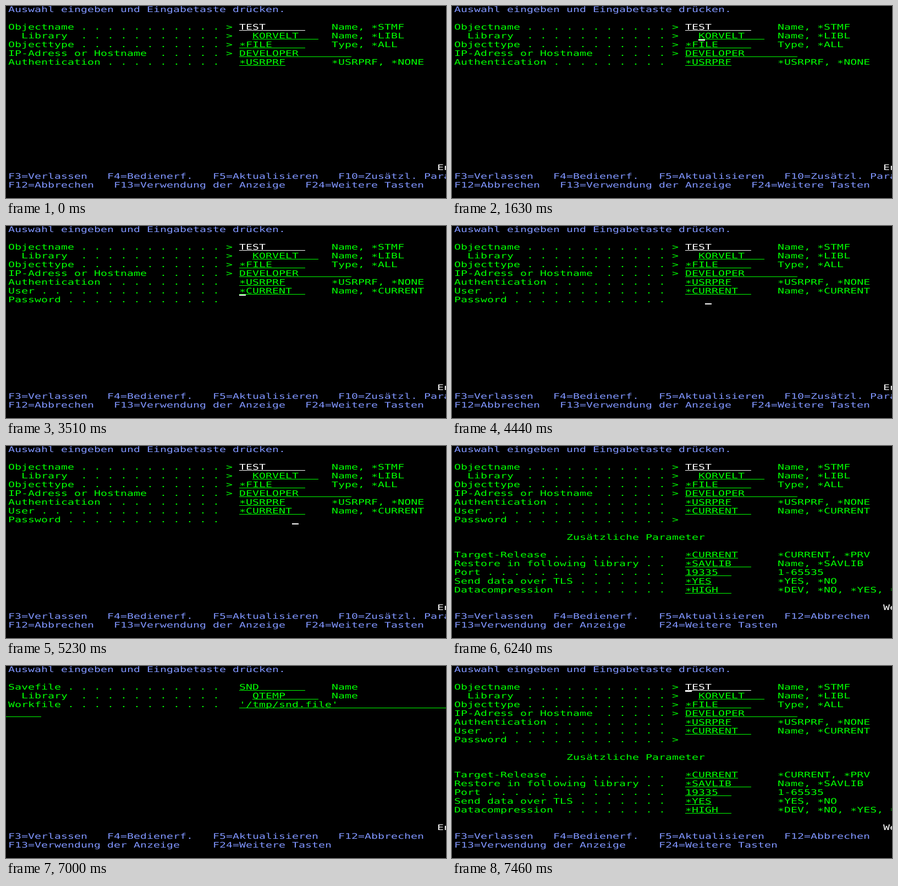
An HTML page for the animation above (8000 ms loop, 800 by 350 pixels).

```html
<!DOCTYPE html>
<html lang="de">
<head>
<meta charset="utf-8">
<title>Terminal</title>
<style>
  html, body { margin: 0; width: 100%; height: 100%; overflow: hidden; background: #000; }
  svg { display: block; }
  text { font: 14px "DejaVu Sans Mono", monospace; white-space: pre; text-rendering: geometricPrecision; }
  rect { shape-rendering: crispEdges; }
</style>
</head>
<body>
<svg id="stage" width="800" height="350" viewBox="0 0 800 350"></svg>
<script>
const LOOP = 8000, CELL_W = 12, CELL_H = 16, LEFT = 4, BASE = 11;
const WIDE = CELL_W / (14 * 0.60205); // wide terminal face on a 12px grid
const GREEN = '#00ff00', BLUE = '#8096ff', WHITE = '#ffffff';
const FIELD = 35, HINT = 49;

const colX = col => LEFT + col * CELL_W;
const rowY = row => BASE + row * CELL_H;

// Asterisks sit at mid height in this terminal face.
function shifts(str) {
  const drop = ch => (ch === '*' ? 2 : 0);
  return [...str].map((ch, i) => drop(ch) - (i ? drop(str[i - 1]) : 0)).join(' ');
}

function put(row, col, str, color = GREEN) {
  const dy = str.includes('*') ? ` dy="${shifts(str)}"` : '';
  return `<text xml:space="preserve" fill="${color}"${dy} ` +
    `transform="translate(${colX(col)} ${rowY(row)}) scale(${WIDE} 1)">${str}</text>`;
}

const line = (row, x, width, color = GREEN) =>
  `<rect x="${x}" y="${rowY(row) + 1}" width="${width}" height="1" fill="${color}"/>`;

function label(row, str, marked) {
  let out = str;
  for (let c = str.length; c < 33; c++) out += c % 2 && c > str.length ? '.' : ' ';
  return put(row, 0, out + (marked ? '>' : ''));
}

function field(row, name, value, cells, hint = '', { marked = false, col = FIELD, color = GREEN } = {}) {
  return label(row, name, marked) + put(row, col, value, color) +
    line(row, colX(col), cells * CELL_W, color) + (hint && put(row, HINT, hint));
}

const keys = (row, ...pairs) => pairs.map(([col, str]) => put(row, col, str, BLUE)).join('');

const title = put(0, 0, 'Auswahl eingeben und Eingabetaste drücken.', BLUE);
const more = str => put(18, 65, str, WHITE);

const mainKeys = more('Ende') +
  keys(19, [0, 'F3=Verlassen'], [15, 'F4=Bedienerf.'], [31, 'F5=Aktualisieren'], [50, 'F10=Zusätzl. Parameter']) +
  keys(20, [0, 'F12=Abbrechen'], [16, 'F13=Verwendung der Anzeige'], [45, 'F24=Weitere Tasten']);

const extraKeys =
  keys(19, [0, 'F3=Verlassen'], [15, 'F4=Bedienerf.'], [31, 'F5=Aktualisieren'], [50, 'F12=Abbrechen']) +
  keys(20, [0, 'F13=Verwendung der Anzeige'], [31, 'F24=Weitere Tasten']);

const marked = true;
const basic =
  field(2, 'Objectname', 'TEST', 10, 'Name, *STMF', { marked, color: WHITE }) +
  field(3, '  Library', 'KORVELT', 10, 'Name, *LIBL', { marked, col: FIELD + 2 }) +
  field(4, 'Objecttype', '*FILE', 10, 'Type, *ALL', { marked }) +
  field(5, 'IP-Adress or Hostname', 'DEVELOPER', 17, '', { marked }) +
  field(6, 'Authentication', '*USRPRF', 7, '*USRPRF, *NONE');
const user = field(7, 'User', '*CURRENT', 10, 'Name, *CURRENT');

const screens = {
  object: title + basic + mainKeys,
  login: title + basic + user + label(8, 'Password') + mainKeys,
  extra: title + basic + user + label(8, 'Password', marked) +
    put(10, 17, 'Zusätzliche Parameter') +
    field(12, 'Target-Release', '*CURRENT', 8, '*CURRENT, *PRV') +
    field(13, 'Restore in following library', '*SAVLIB', 10, 'Name, *SAVLIB') +
    field(14, 'Port', '19335', 7, '1-65535') +
    field(15, 'Send data over TLS', '*YES', 4, '*YES, *NO') +
    field(16, 'Datacompression', '*HIGH', 7, '*DEV, *NO, *YES, *') +
    more('Weitere') + extraKeys,
  files: title +
    field(2, 'Savefile', 'SND', 10, 'Name') +
    field(3, '  Library', 'QTEMP', 10, 'Name', { col: FIELD + 2 }) +
    field(4, 'Workfile', "'/tmp/snd.file'", 32) + line(5, 0, 64) +
    more('Ende') + extraKeys
};

const screenTimes = [[0, 'object'], [2410, 'login'], [5690, 'extra'], [6540, 'files'], [7460, 'extra']];

// [time, row, column]; no row means the cursor is dark
const cursorTimes = [
  [0], [60, 2, 35], [610], [1160, 2, 35],
  [1630, 3, 37], [1780, 4, 35], [1950, 5, 35], [2030, 6, 35],
  [2410], [2490, 7, 35], [2960], [3510, 7, 35], [3570, 8, 35], [4040],
  [4210, 8, 37], [4440, 8, 38], [4590, 8, 39], [4680, 8, 40], [4830, 8, 41],
  [4980], [5060, 8, 42], [5230, 8, 43],
  [5690, 2, 35], [6240], [6540, 2, 35], [7000], [7460, 2, 35]
];

const stage = document.getElementById('stage');
stage.innerHTML = '<rect width="800" height="350" fill="#000"/>' +
  Object.entries(screens).map(([id, body]) => `<g id="${id}">${body}</g>`).join('') +
  `<rect id="cursor" width="${CELL_W}" height="2" fill="${WHITE}"/>`;

const groups = Object.keys(screens).map(id => document.getElementById(id));
const cursor = document.getElementById('cursor');
const latest = (steps, t) => steps.filter(step => step[0] <= t).pop();

function render(t) {
  const [, active] = latest(screenTimes, t);
  for (const g of groups) g.style.display = g.id === active ? '' : 'none';
  const [, row, col] = latest(cursorTimes, t);
  cursor.style.display = row === undefined ? 'none' : '';
  if (row !== undefined) {
    cursor.setAttribute('x', colX(col));
    cursor.setAttribute('y', rowY(row) + 2);
  }
}

const start = performance.now();
function tick() {
  render((performance.now() - start) % LOOP);
  requestAnimationFrame(tick);
}
render(0);
requestAnimationFrame(tick);
</script>
</body>
</html>
```
